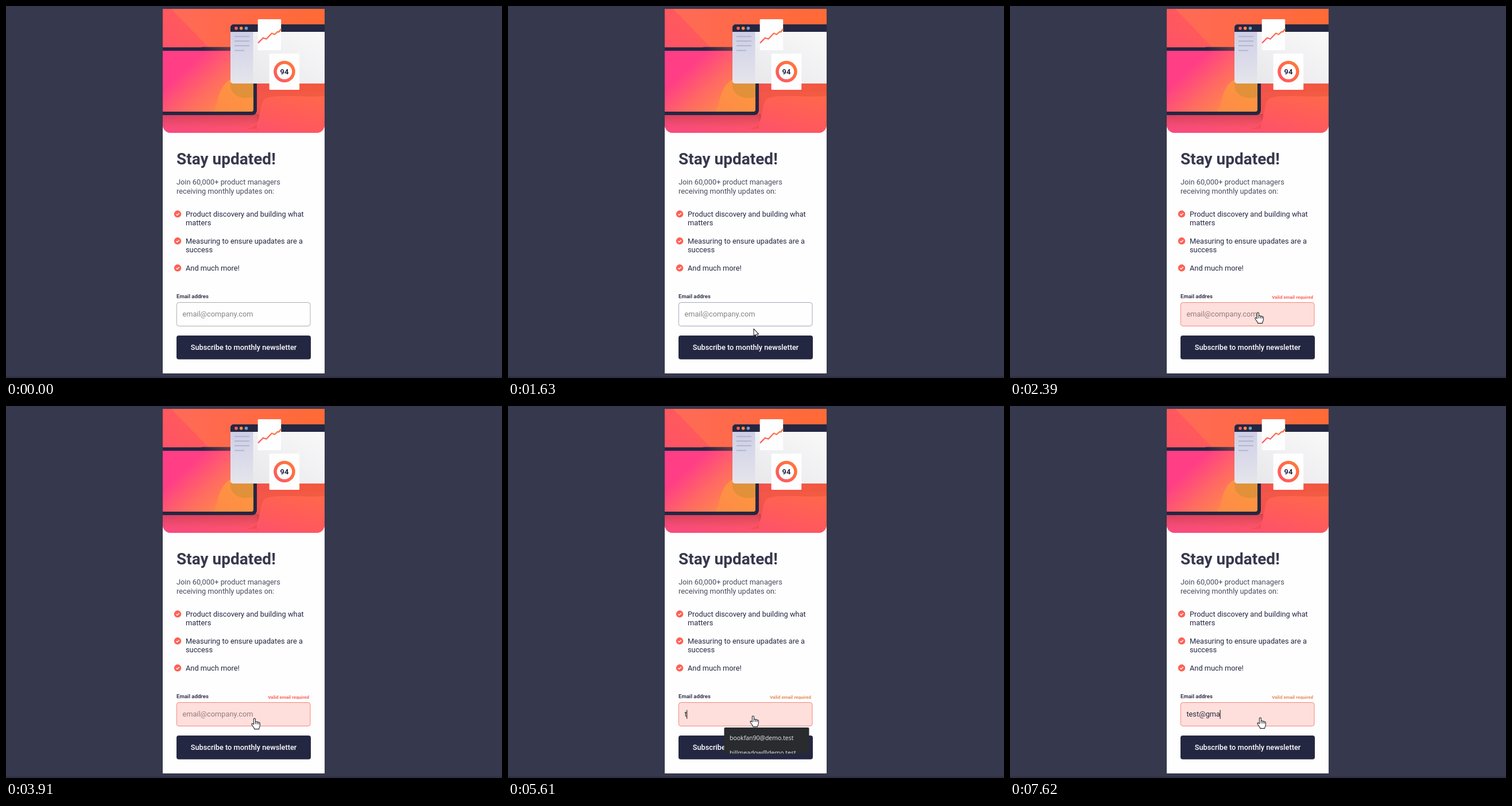
Animation, 864 px wide and 648 px high, one loop 8 s. Source, as an HTML page:

```html
<!DOCTYPE html>
<html lang="en">
<head>
<meta charset="utf-8">
<title>Stay updated</title>
<style>
  html, body { margin: 0; width: 100%; height: 100%; overflow: hidden; background: #36384d; }
  svg { display: block; width: 864px; height: 648px; }
  text { font: 12.8px Roboto, sans-serif; fill: #242742; white-space: pre; }
  .title { font-size: 28px; font-weight: 700; fill: #36384d; }
  .intro { fill: #4a4c5e; }
  .label { font-size: 9.6px; font-weight: 700; fill: #36384d; }
  .error { font-size: 8px; font-weight: 700; }
  .action { font-weight: 500; fill: #fff; text-anchor: middle; }
  .score { font-weight: 700; font-size: 13px; text-anchor: middle; }
  .option { font: 10.5px "Open Sans", "Noto Sans", sans-serif; fill: #e8eaed; }
</style>
</head>
<body>
<svg viewBox="0 0 864 648">
  <defs>
    <linearGradient id="sky" x1="0" y1=".75" x2="1" y2=".1">
      <stop offset="0" stop-color="#ff4c74"/><stop offset=".5" stop-color="#ff5d55"/><stop offset="1" stop-color="#ff6b36"/>
    </linearGradient>
    <linearGradient id="wedge" x1="0" x2="1">
      <stop offset="0" stop-color="#ff6a58"/><stop offset="1" stop-color="#ff6a35"/>
    </linearGradient>
    <linearGradient id="floor" x1="0" y1="1" x2="1" y2="0">
      <stop offset="0" stop-color="#f84882"/><stop offset=".55" stop-color="#ff5a5c"/><stop offset="1" stop-color="#ff6a48"/>
    </linearGradient>
    <linearGradient id="screen" x1="0" y1=".25" x2=".9" y2=".9">
      <stop offset=".2" stop-color="#ff3e86"/><stop offset=".55" stop-color="#ff6a62"/><stop offset="1" stop-color="#ff9440"/>
    </linearGradient>
    <linearGradient id="blob" x1="0" y1="1" x2="1" y2="0">
      <stop offset="0" stop-color="#ff8a48"/><stop offset="1" stop-color="#fb9a3c"/>
    </linearGradient>
    <linearGradient id="shade" x1="0" y1="0" x2="0" y2="1">
      <stop offset="0" stop-color="#a83048" stop-opacity=".5"/><stop offset="1" stop-color="#c83c50" stop-opacity="0"/>
    </linearGradient>
    <linearGradient id="bezel" x1="273" x2="391" y1="0" y2="0" gradientUnits="userSpaceOnUse">
      <stop offset=".6" stop-color="#242742"/><stop offset="1" stop-color="#6a3a48"/>
    </linearGradient>
    <linearGradient id="side" x1="0" y1="0" x2="0" y2="1">
      <stop offset="0" stop-color="#cdcfe7"/><stop offset="1" stop-color="#e6e5ec"/>
    </linearGradient>
    <linearGradient id="pane" x1="0" y1="1" x2="1" y2="0">
      <stop offset="0" stop-color="#e6e6ea"/><stop offset="1" stop-color="#fafafa"/>
    </linearGradient>
    <linearGradient id="warm" x1="0" y1="1" x2="1" y2="0">
      <stop offset="0" stop-color="#ff5566"/><stop offset="1" stop-color="#ff7a35"/>
    </linearGradient>
    <clipPath id="hero"><path d="M273 5H555V207a14 14 0 0 1-14 14H287a14 14 0 0 1-14-14Z"/></clipPath>
    <clipPath id="window"><path d="M555 32H396a5 5 0 0 0-5 5V130a5 5 0 0 0 5 5H555Z"/></clipPath>
    <clipPath id="display"><path d="M273 78H431V180a4 4 0 0 1-4 4H273Z"/></clipPath>
    <clipPath id="shortList"><rect x="376" y="560" width="149" height="45.5"/></clipPath>
    <g id="tick">
      <circle r="6.2" fill="#ff6155"/>
      <path d="M-2.6 .2 -.7 2 2.7-1.6" fill="none" stroke="#fff" stroke-width="1.4"/>
    </g>
  </defs>

  <rect width="864" height="648" fill="#36384d"/>
  <rect y="645" width="864" height="3" fill="#322f44"/>
  <rect x="273" y="5" width="282" height="635" fill="#fefefe"/>

  <g clip-path="url(#hero)">
    <rect x="273" y="5" width="282" height="216" fill="url(#sky)"/>
    <path d="M288 5H555V92H372Z" fill="url(#wedge)"/>
    <path d="M273 186H440V150H555V221H273Z" fill="url(#floor)"/>
    <path d="M437 135H555V157C510 160 470 152 450 162C438 178 450 208 420 214H437Z" fill="#d5402f" fill-opacity=".3"/>
    <path d="M273 188H440C444 200 432 212 410 213H273Z" fill="url(#shade)"/>
    <path d="M273 72H429a8 8 0 0 1 8 8V182a8 8 0 0 1-8 8H273Z" fill="#242742"/>
    <path d="M340 71.5H391V78H346Z" fill="url(#bezel)"/>
    <g clip-path="url(#display)">
      <rect x="273" y="78" width="158" height="106" fill="url(#screen)"/>
      <path d="M360 184C370 174 366 160 377 142C385 128 402 120 431 122V184Z" fill="url(#blob)"/>
      <path d="M391 130H431V158C416 164 393 158 391 140Z" fill="#b08a30" fill-opacity=".35"/>
    </g>
    <g clip-path="url(#window)">
      <rect x="391" y="32" width="164" height="103" fill="url(#pane)"/>
      <rect x="391" y="45" width="39.5" height="90" fill="url(#side)"/>
      <rect x="391" y="32" width="164" height="13" fill="#242742"/>
      <circle cx="401" cy="38.7" r="2.8" fill="#ff5a62"/>
      <circle cx="409.7" cy="38.7" r="2.8" fill="#ff8c4a"/>
      <circle cx="418.5" cy="38.7" r="2.8" fill="#70a0c6"/>
      <path d="M398 53.2H424M398 61.2H424M398 69.2H424M398 77.5H415" stroke="#b5b7d0" stroke-width="2.2"/>
    </g>
    <rect x="438.7" y="23" width="40.5" height="54" rx="1.5" fill="#fefefe"/>
    <path d="M439 64.5 448 55.5 453.5 57.5 463 47.5 468 49.5 473 45 475.5 45 479 40" fill="none" stroke="url(#warm)" stroke-width="2.3"/>
    <rect x="458.7" y="83" width="52.5" height="63" rx="1.5" fill="#fefefe"/>
    <circle cx="485" cy="114.3" r="16" fill="none" stroke="url(#warm)" stroke-width="5.6"/>
    <text class="score" x="485" y="119">94</text>
  </g>

  <text class="title" x="297" y="275.5">Stay updated!</text>
  <text class="intro" x="297" y="311">Join 60,000+ product managers</text>
  <text class="intro" x="297" y="327">receiving monthly updates on:</text>
  <use href="#tick" x="299" y="362.3"/>
  <text x="313" y="367">Product discovery and building what</text>
  <text x="313" y="382">matters</text>
  <use href="#tick" x="299" y="409.3"/>
  <text x="313" y="414">Measuring to ensure upadates are a</text>
  <text x="313" y="429">success</text>
  <use href="#tick" x="299" y="456.3"/>
  <text x="313" y="461">And much more!</text>

  <text class="label" x="297" y="509">Email addres</text>
  <text class="error" id="error" x="456.3" y="509.5">Valid email required</text>
  <rect id="field" x="297.3" y="516.5" width="232.7" height="41" rx="4" stroke-width="1"/>
  <text id="value" x="307.4" y="541"></text>
  <rect id="caret" y="529.5" width="1" height="15.5" fill="#111"/>
  <rect id="button" x="297" y="574" width="234" height="41.5" rx="4"/>
  <text class="action" x="414" y="599">Subscribe to monthly newsletter</text>

  <g id="fullList"><rect x="375" y="325" width="165" height="187" rx="2" fill="#292b2e"/></g>
  <g id="filteredList" clip-path="url(#shortList)"><rect x="376.5" y="560" width="148" height="50" rx="2" fill="#292b2e"/></g>

  <g id="pointer" stroke="#26262c" stroke-width="1.1" stroke-linejoin="round" fill="#fff">
    <path id="hand" d="M-1.6 10.5V1.2C-1.6-.5 1.4-.5 1.4 1.2V6C2.2 5 4.3 5.3 4.4 6.5C5.4 5.7 7 6.2 7.1 7.2C8.3 6.6 9.4 7.3 9.4 8.6V12.5C9.4 14.8 7.8 15.5 7.6 18.6H-.2C-.4 16-3.4 14.2-4.8 10.9C-5.8 8.8-3.8 7.8-1.6 10.5ZM1.4 6V10M4.4 6.5V10.2M7.1 7.2V10.6"/>
    <path id="arrow" d="M0 0V12.6L2.9 10 4.9 14.6 7 13.7 5 9.2H8.9Z"/>
  </g>
</svg>
<script>
const LOOP = 8000, FADE = 200;
const CLICK_ERROR = 1850, FOCUS = 4680, FIRST_KEY = 5610, LIST_CLOSE = 5750;

// time, x, y of the pointer tip
const path = [
  [70, 494, 624], [210, 480, 604], [410, 440, 590], [590, 420, 574], [690, 417, 557], [830, 424, 537],
  [1560, 424, 538], [1630, 428, 562], [1700, 428, 584], [2040, 428, 586], [2110, 427, 572],
  [2180, 430, 550], [2320, 432, 536], [2390, 432, 534], [3840, 432, 534], [3910, 433, 544],
  [4050, 431, 580], [4400, 430, 588], [4470, 429, 574], [4610, 427, 540], [4680, 425, 533], [4750, 422, 531],
  [5540, 422, 531], [5610, 427, 540], [6180, 436, 543]
];
const hovers = [[200, 594], [1635, 2105], [4030, 4466]];
const typing = [[5610, "t"], [5720, "te"], [5830, "tes"], [6560, "test"], [6890, "test@"], [7550, "test@gm"], [7620, "test@gma"]];
const blinkOff = [[5210, 5610], [6360, 6560], [7420, 7550]];
const suggestions = ["bookfan90@demo.test", "hillmeadow@demo.test", "reader.box@demo.test", "tealight7@demo.test",
  "inbox.two@demo.test", "oldletters@demo.test", "weekly.post@demo.test"];

const el = id => document.getElementById(id);
const show = (id, on) => el(id).setAttribute("visibility", on ? "visible" : "hidden");
const set = (id, attrs) => Object.entries(attrs).forEach(([k, v]) => el(id).setAttribute(k, v));
const within = (t, spans) => spans.some(([a, b]) => t >= a && t < b);
const ease = u => 1 - (1 - Math.min(1, Math.max(0, u))) ** 2;
const blend = (a, b, k) => `rgb(${a.map((v, i) => Math.round(v + (b[i] - v) * k))})`;

function addOptions(id, items, x, y) {
  items.forEach((item, i) => {
    const text = document.createElementNS("http://www.w3.org/2000/svg", "text");
    text.setAttribute("class", "option");
    text.setAttribute("x", x);
    text.setAttribute("y", y + i * 26);
    text.textContent = item;
    el(id).append(text);
  });
}

function pointerAt(t) {
  const i = path.findIndex(p => p[0] > t);
  if (i < 0) return path[path.length - 1].slice(1);
  const [t0, x0, y0] = path[i - 1], [t1, x1, y1] = path[i];
  const k = (t - t0) / (t1 - t0);
  return [x0 + (x1 - x0) * k, y0 + (y1 - y0) * k];
}

function drawPointer(t) {
  const visible = t >= path[0][0];
  const [x, y] = visible ? pointerAt(t) : [0, 0];
  const clickable = y <= 558 || (y >= 574 && y <= 616);
  set("pointer", { transform: `translate(${x} ${y})` });
  show("hand", visible && clickable);
  show("arrow", visible && !clickable);
}

function drawField(t) {
  const invalid = t >= CLICK_ERROR;
  const typed = typing.filter(([at]) => at <= t).pop()?.[1] || "";
  const value = el("value");
  value.textContent = typed || "email@company.com";
  value.style.fill = typed ? "#242742" : invalid ? "#917b80" : "#858585";
  set("field", {
    fill: invalid ? "#ffdfdb" : "#fefefe",
    stroke: invalid ? "#f2857d" : t >= 590 ? "#a3a6b8" : "#adadb2"
  });
  set("caret", { x: 307.4 + (typed ? value.getComputedTextLength() : 0) - .4 });
  show("caret", t >= FOCUS && !within(t, blinkOff));
  show("error", invalid);
  el("error").style.fill = t >= FIRST_KEY ? "#e58a55" : "#ff6155";
}

function draw(t) {
  const hover = hovers.reduce((sum, [a, b]) => sum + ease((t - a) / FADE) - ease((t - b) / FADE), 0);
  set("button", { fill: blend([36, 39, 66], [255, 98, 87], hover) });
  drawField(t);
  show("fullList", t >= FOCUS && t < FIRST_KEY);
  show("filteredList", t >= FIRST_KEY && t < LIST_CLOSE);
  drawPointer(t);
}

addOptions("fullList", suggestions, 386, 344);
addOptions("filteredList", suggestions.slice(0, 2), 386, 582);

const start = performance.now();
function tick() {
  draw((performance.now() - start) % LOOP);
  requestAnimationFrame(tick);
}
tick();
</script>
</body>
</html>
```
